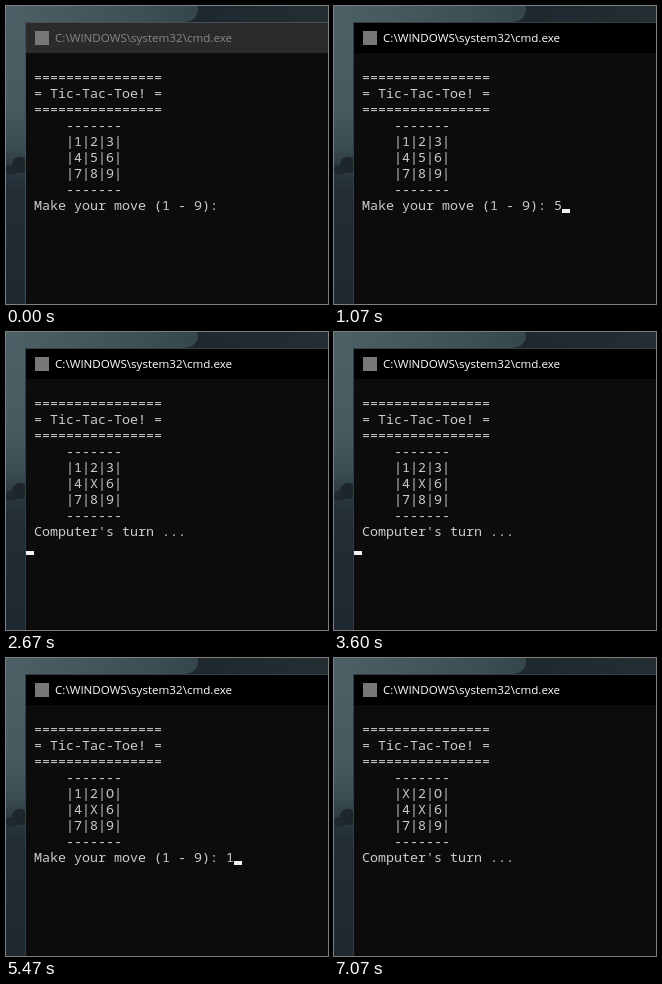
An HTML page with a canvas that plays this animation: 322 px wide and 298 px high, repeating every 7.14 s.

```html
<!DOCTYPE html>
<html lang="en">
<head>
<meta charset="utf-8">
<title>Tic-Tac-Toe</title>
<style>
  html, body { margin: 0; height: 100%; overflow: hidden; background: #0c0c0c; }
  canvas { display: block; }
</style>
</head>
<body>
<canvas id="stage" width="322" height="298"></canvas>
<script>
const ctx = document.getElementById('stage').getContext('2d');
const LOOP = 7140;
const FOCUS = 70;
const CELL_W = 8, CELL_H = 16, LEFT = 20, TOP = 47, BASELINE = 13;
const PROMPT_ROW = 9;
const PROMPT = ' Make your move (1 - 9): ';

const moves = [
  { at: 2200, square: 5, mark: 'X' },
  { at: 3700, square: 3, mark: 'O' },
  { at: 6000, square: 1, mark: 'X' },
];
const turns = [
  { from: 0, typedAt: 670, key: '5', to: 2200 },
  { from: 3700, typedAt: 5130, key: '1', to: 6000 },
];
const cursorOn = [[331, 1340], [1870, 2896], [3409, 4435], [4948, 7000]];

function rect(x, y, w, h, fill) {
  ctx.fillStyle = fill;
  ctx.fillRect(x, y, w, h);
}

function ellipse(x, y, rx, ry, fill) {
  ctx.fillStyle = fill;
  ctx.beginPath();
  ctx.ellipse(x, y, rx, ry, 0, 0, 2 * Math.PI);
  ctx.fill();
}

function gradient(x0, y0, x1, y1, ...stops) {
  const g = ctx.createLinearGradient(x0, y0, x1, y1);
  stops.forEach(([at, color]) => g.addColorStop(at, color));
  return g;
}

function drawBackdrop() {
  rect(0, 0, 322, 17, gradient(190, 0, 322, 0, [0, '#1e282e'], [1, '#242d32']));
  const haze = gradient(0, 0, 190, 0, [0, '#4c6165'], [0.5, '#42565a'], [1, '#36474b']);
  rect(0, 0, 180, 17, haze);
  ellipse(178, 4, 14, 12, haze);

  rect(0, 16, 20, 282, gradient(0, 16, 0, 298,
    [0, '#4b6064'], [0.3, '#465a5f'], [0.44, '#3b4d53'], [0.5, '#2e3c43'],
    [0.6, '#222d34'], [1, '#1d2830']));
  ellipse(14, 159, 8, 8, '#1d262b');
  ellipse(5, 164, 6, 5, '#1f292f');
}

function drawWindow(active) {
  const border = active ? '#383c3e' : '#484c4e';
  rect(19, 16, 303, 282, border);
  rect(20, 17, 302, 30, active ? '#000' : '#2b2b2b');
  rect(20, 47, 302, 251, '#0c0c0c');
  rect(29, 25, 14, 14, '#777');
  ctx.font = '11.6px "Open Sans", sans-serif';
  ctx.fillStyle = active ? '#fff' : '#888';
  ctx.fillText('C:\\WINDOWS\\system32\\cmd.exe', 49, 36);
}

function screenLines(t, turn) {
  const squares = [...'123456789'];
  moves.filter(m => t >= m.at).forEach(m => squares[m.square - 1] = m.mark);
  const row = i => `     |${squares.slice(i, i + 3).join('|')}|`;
  const bar = ' ' + '='.repeat(16), edge = '     -------';
  const status = turn
    ? PROMPT + (t >= turn.typedAt ? turn.key : '')
    : " Computer's turn ...";
  return ['', bar, ' = Tic-Tac-Toe! =', bar, edge, row(0), row(3), row(6), edge, status];
}

function drawConsole(t) {
  const turn = turns.find(p => t >= p.from && t < p.to);
  const lines = screenLines(t, turn);
  ctx.font = '13.333px "Noto Sans Mono", monospace';
  ctx.fillStyle = '#ccc';
  lines.forEach((line, i) => ctx.fillText(line, LEFT, TOP + i * CELL_H + BASELINE));

  if (cursorOn.some(([on, off]) => t >= on && t < off)) {
    const col = turn ? lines[PROMPT_ROW].length : 0;
    const row = turn ? PROMPT_ROW : PROMPT_ROW + 1;
    rect(LEFT + col * CELL_W, TOP + (row + 1) * CELL_H - 4, CELL_W, 4, '#f2f2f2');
  }
}

function frame() {
  const t = performance.now() % LOOP;
  drawBackdrop();
  drawWindow(t >= FOCUS);
  drawConsole(t);
  requestAnimationFrame(frame);
}
frame();
</script>
</body>
</html>
```
